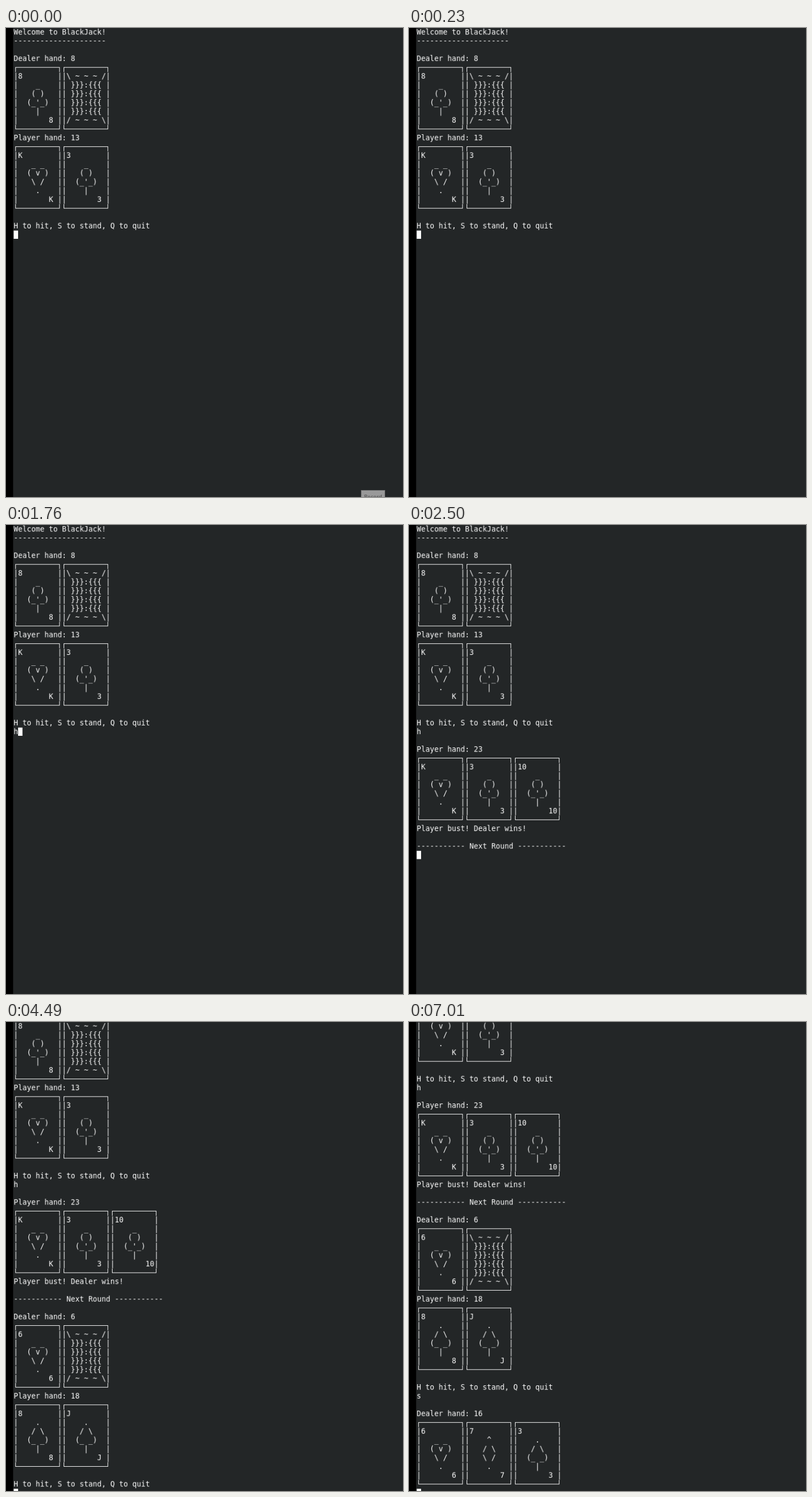
Animation of 689x812 px, one loop 8000 ms. Source, as an HTML page with a canvas:

```html
<!DOCTYPE html>
<html lang="en">
<head>
<meta charset="utf-8">
<title>Card game in a terminal</title>
<style>
html, body { margin: 0; width: 100%; height: 100%; overflow: hidden; background: #232627; }
canvas { display: block; }
</style>
</head>
<body>
<canvas id="stage" width="689" height="812"></canvas>
<script>
const LOOP = 8000, SCALE = 0.953;
const CW = 8, CH = 16, EDGE = 13, LEFT = 14, BASELINE = 12;
const MID_X = 3, MID_Y = 7;
const VISIBLE_ROWS = 54;
const BG = '#232627', INK = '#fcfcfc';

const stage = document.getElementById('stage');
const ctx = stage.getContext('2d', { alpha: false });

// The terminal is drawn on a whole-pixel grid, then scaled onto the stage
const screen = document.createElement('canvas');
screen.width = 724;
screen.height = 854;
const term = screen.getContext('2d', { alpha: false });

const SUITS = {
  club: ['    _    ', '   ( )   ', "  (_'_)  ", '    |    '],
  heart: ['   _ _   ', '  ( v )  ', '   \\ /   ', '    .    '],
  spade: ['    .    ', '   / \\   ', '  (_ _)  ', '    |    '],
  diamond: ['    ^    ', '   / \\   ', '   \\ /   ', '    .    ']
};
const BACK = ['\\ ~ ~ ~ /', ...Array(4).fill(' }}}:{{{ '), '/ ~ ~ ~ \\'];

function face(rank, suit) {
  return [rank.padEnd(9), ...SUITS[suit], rank.padEnd(2).padStart(9)];
}

// Eight text rows holding the cards side by side
function hand(...cards) {
  const bar = '─'.repeat(9);
  const body = BACK.map((_, i) => cards.map(c => '|' + c[i] + '|').join(''));
  return [`┌${bar}┐`.repeat(cards.length), ...body, `└${bar}┘`.repeat(cards.length)];
}

const PROMPT = 'H to hit, S to stand, Q to quit';
const king = face('K', 'heart'), three = face('3', 'club'), six = face('6', 'heart');

const opening = [
  'Welcome to BlackJack!', '-'.repeat(21), '',
  'Dealer hand: 8', ...hand(face('8', 'club'), BACK),
  'Player hand: 13', ...hand(king, three),
  '', PROMPT, ''
];
const hitKey = [...opening.slice(0, -1), 'h'];
const bust = [
  ...hitKey, '',
  'Player hand: 23', ...hand(king, three, face('10', 'club')),
  'Player bust! Dealer wins!', '',
  '----------- Next Round -----------', ''
];
const secondRound = [
  ...bust,
  'Dealer hand: 6', ...hand(six, BACK),
  'Player hand: 18', ...hand(face('8', 'spade'), face('J', 'spade')),
  '', PROMPT, ''
];
const standKey = [...secondRound.slice(0, -1), 's'];
const dealerTurn = [
  ...standKey, '',
  'Dealer hand: 16', ...hand(six, face('7', 'diamond'), face('3', 'spade')), ''
];

const SCREENS = [
  [0, opening], [1760, hitKey], [2460, [...hitKey, '']], [2500, bust],
  [4490, secondRound], [6280, standKey], [7010, dealerTurn]
];

function boxChar(ch, x, y) {
  const from = '┌└'.includes(ch) ? MID_X : 0;
  const to = '┐┘'.includes(ch) ? MID_X + 1 : CW;
  term.fillRect(x + from, y + MID_Y, to - from, 1);
  if ('┌┐'.includes(ch)) term.fillRect(x + MID_X, y + MID_Y, 1, CH - MID_Y);
  if ('└┘'.includes(ch)) term.fillRect(x + MID_X, y, 1, MID_Y);
}

function drawTerminal(lines) {
  term.fillStyle = BG;
  term.fillRect(0, 0, screen.width, screen.height);
  term.fillStyle = '#000';
  term.fillRect(0, 0, EDGE, screen.height);

  term.fillStyle = INK;
  term.font = '13.333px "DejaVu Sans Mono", monospace';
  const shown = lines.slice(-VISIBLE_ROWS);
  shown.forEach((line, row) => {
    [...line].forEach((ch, col) => {
      const x = LEFT + col * CW, y = row * CH;
      if ('┌─┐└┘'.includes(ch)) boxChar(ch, x, y);
      else if (ch !== ' ') term.fillText(ch, x, y + BASELINE);
    });
  });
  // The cursor always sits at the end of the last line
  const last = shown.length - 1;
  term.fillRect(LEFT + shown[last].length * CW, last * CH, CW, CH - 1);

  ctx.imageSmoothingQuality = 'high';
  ctx.drawImage(screen, 0, 0, screen.width * SCALE, screen.height * SCALE);
}

// Small tooltip that drifts up and right in steps, then vanishes
function drawTooltip(t) {
  if (t >= 230) return;
  const step = t < 30 ? 0 : 1 + Math.floor((t - 30) / 67);
  const x = 616 + Math.round(step * 8 / 3), y = 800 - Math.round(step * 10 / 3);
  ctx.fillStyle = '#6f6f6f';
  ctx.fillRect(x, y, 42, 24);
  ctx.fillStyle = '#999999';
  ctx.fillRect(x + 1, y + 1, 40, 22);
  ctx.fillStyle = '#444444';
  ctx.font = '9.5px "Noto Sans", sans-serif';
  ctx.textAlign = 'center';
  ctx.fillText('Record', x + 21, y + 15);
}

function frame() {
  const t = performance.now() % LOOP;
  drawTerminal(SCREENS.filter(([start]) => t >= start).pop()[1]);
  drawTooltip(t);
  requestAnimationFrame(frame);
}
frame();
</script>
</body>
</html>
```
